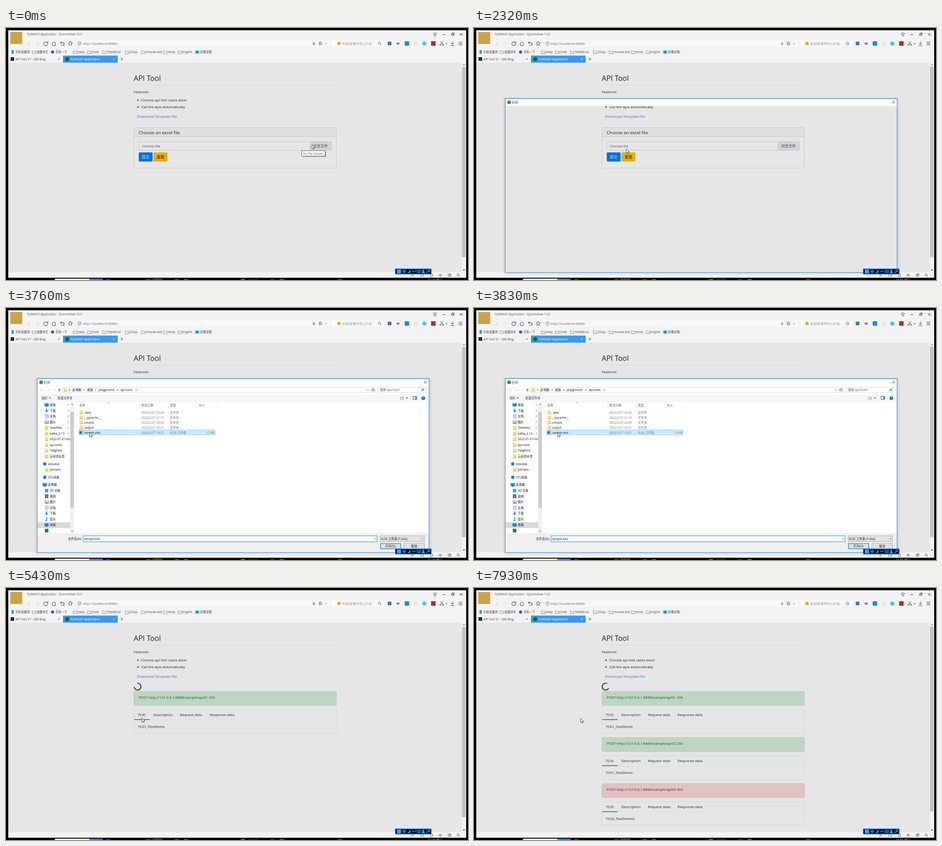
Animation, 1013 px wide and 553 px high, one loop 8 s. Source, as an HTML page:

```html
<!DOCTYPE html>
<html lang="zh-CN">
<head>
<meta charset="utf-8">
<title>API Tool</title>
<style>
html, body { margin: 0; width: 100%; height: 100%; overflow: hidden; background: #000; }
svg { display: block; width: 100vw; height: 100vh; }
text { font-family: "Open Sans", "Noto Sans CJK SC", "Noto Sans CJK", "Noto Sans", sans-serif; white-space: pre; }
</style>
</head>
<body>
<svg id="stage" viewBox="0 0 1013 553"></svg>
<script>
const LOOP = 8000;
const UI = 6.5, BODY = 7.93;
const stage = document.getElementById('stage');

function el(parent, name, attrs = {}) {
  const node = document.createElementNS('http://www.w3.org/2000/svg', name);
  for (const key in attrs) node.setAttribute(key, attrs[key]);
  parent.append(node);
  return node;
}
const group = (parent, attrs) => el(parent, 'g', attrs);
const rect = (p, x, y, width, height, fill, extra) => el(p, 'rect', { x, y, width, height, fill, ...extra });
const dot = (p, cx, cy, r, fill, extra) => el(p, 'circle', { cx, cy, r, fill, ...extra });
const line = (p, d, stroke = '#444', width = 1, fill = 'none') =>
  el(p, 'path', { d, stroke, fill, 'stroke-width': width });
function text(p, x, y, str, size = UI, fill = '#222', extra) {
  const node = el(p, 'text', { x, y, 'font-size': size, fill, ...extra });
  node.textContent = str;
  return node;
}
// Crisp one pixel frame
const box = (p, x, y, w, h, fill, stroke, rx = 0) =>
  rect(p, x + .5, y + .5, w - 1, h - 1, fill, { stroke, rx });
const cross = (p, x, y, r, color) =>
  line(p, `M${x - r} ${y - r}l${2 * r} ${2 * r}m0 ${-2 * r}l${-2 * r} ${2 * r}`, color, .9);
const chevron = (p, x, y, dx, dy, color = '#555') => dx
  ? line(p, `M${x - dx} ${y - 2}L${x} ${y}L${x - dx} ${y + 2}`, color, .9)
  : line(p, `M${x - 2.2} ${y - dy}L${x} ${y}L${x + 2.2} ${y - dy}`, color, .9);
const lens = (p, x, y, r = 2.6) => {
  dot(p, x, y, r, 'none', { stroke: '#555', 'stroke-width': .9 });
  line(p, `M${x + r * .7} ${y + r * .7}l2 2`, '#555');
};

function icon(p, kind, x, y) {
  if (kind === 'folder') {
    rect(p, x - 3.5, y - 4, 7.5, 8, '#f8d775');
    rect(p, x - 3.5, y + 2.5, 7.5, 1.5, '#e9bd4e');
  } else if (kind === 'linked') {
    icon(p, 'folder', x, y);
    rect(p, x - .5, y - 1.5, 4.5, 5.5, '#fff');
    rect(p, x + .5, y, 2.5, 3, '#7fa9a0');
  } else if (kind === 'screen') {
    rect(p, x - 4.5, y - 3.5, 9, 6.5, '#1c86d8');
    rect(p, x - 2, y + 3, 4, 1, '#1c6aaa');
  } else if (kind === 'down') {
    line(p, `M${x - 1.3} ${y - 4}h2.6v4h2.7l-4 4l-4-4h2.7z`, 'none', 0, '#2b8be0');
  } else if (kind === 'doc') {
    box(p, x - 3, y - 4, 7, 8, '#fff', '#7c98ad');
    line(p, `M${x - 1.5} ${y - 1}h4m-4 2h4`, '#5a8fb5', .7);
  } else if (kind === 'picture') {
    box(p, x - 4, y - 3, 9, 7, '#dff0fb', '#7c98ad');
    line(p, `M${x - 3} ${y + 2.5}l2.5-3l2 2l1.5-1l1 2z`, 'none', 0, '#3a7fb5');
  } else if (kind === 'video') {
    rect(p, x - 3.5, y - 4, 7, 8, '#333');
    rect(p, x - 2, y - 3, 4, 6, '#5a9ad0');
  } else if (kind === 'music') {
    line(p, `M${x} ${y + 2}v-5.5l2.5 2.5`, '#1c86d8', 1.2);
    dot(p, x - 1, y + 2.5, 1.6, '#1c86d8');
  } else if (kind === 'cube') {
    rect(p, x - 3.5, y - 3.5, 7, 7, '#28a3d8', { rx: 1 });
  } else if (kind === 'green') {
    rect(p, x - 4, y - 4, 8, 8, '#2e7d46', { rx: 1 });
  } else if (kind === 'cloud') {
    dot(p, x, y, 3.6, '#1c7fd6');
  }
}

function star(p, x, y, r) {
  let d = '';
  for (let i = 0; i < 10; i++) {
    const a = i * Math.PI / 5 - Math.PI / 2, k = i % 2 ? r * .45 : r;
    d += `${i ? 'L' : 'M'}${x + k * Math.cos(a)} ${y + k * Math.sin(a)}`;
  }
  line(p, d + 'z', '#444', .9);
}

function drawBrowser(p) {
  rect(p, 0, 0, 1013, 553, '#000');
  rect(p, 5, 5, 1004, 543, '#f3f3f3');
  rect(p, 9.5, 9, 26, 26, '#c9a548');
  text(p, 46, 16.2, 'PyWebIO Application - Quormelow 13.0', 6.6, '#555');

  line(p, 'M937 12l2-1.5q1.5 1.5 3 0l2 1.5l-1 2l-1-.5v4h-3v-4l-1 .5z', '#444', .9);
  line(p, 'M957 14.5h6', '#333');
  line(p, 'M977 12.5h4v4h-4zM978.5 12v-1h4v4h-1', '#333', .9);
  cross(p, 998, 14, 2.7, '#333');

  // Navigation row
  rect(p, 154, 27, 556, 14, '#f8f8f8');
  line(p, 'M53 30l-4.5 4l4.5 4M67 30l4.5 4l-4.5 4', '#c8c8c8');
  line(p, 'M90.5 31.5a4.3 4.3 0 1 0 1 2.5M91.8 29v3.5h-3.5', '#444', 1.1);
  line(p, 'M100.5 34.5l4.5-4.5l4.5 4.5M102 33.5v5h6v-5', '#444');
  line(p, 'M122 30l-2.5 2.3l2.5 2.3M120 32.3h4.5a3 3 0 0 1 0 6h-3.5', '#444', 1.1);
  star(p, 141, 34, 5.2);
  line(p, 'M161 30l3.5 1v3.5q-.5 3-3.5 4q-3-1-3.5-4v-3.5zM159.5 34h3M161 32.5v3', '#666', .8);
  text(p, 168, 36.7, 'http://localhost:8080/', 7.58, '#666');
  line(p, 'M676 31l-3 4h2.5l-1 3l3.5-4h-2.5z', '#666', .8);
  star(p, 689, 34, 4);
  chevron(p, 701.5, 35.5, 0, 2);
  rect(p, 714, 27, 7, 14, '#fff');
  rect(p, 722, 27, 107, 14, '#f8f8f8');
  dot(p, 730, 34, 3.6, '#d9a520');
  text(p, 737, 36.5, '实拍海港市中心灯会', 7.3, '#999');
  lens(p, 819, 33.5);
  rect(p, 837, 30, 8, 8, '#477d95');
  line(p, 'M856 34q4-3.5 7.5 0q-3.5 3.5-7.5 0', '#47617d', 1);
  dot(p, 859.7, 34.5, 1.6, '#2d5b95');
  rect(p, 874, 29, 10, 10, '#2487ec', { rx: 2.5 });
  rect(p, 894, 30, 9, 8.5, '#f1e3d3', { rx: 2 });
  dot(p, 917.3, 34, 4.6, '#53c0e2');
  rect(p, 932, 29, 10, 10, '#a63a28');
  line(p, 'M953 29.5l5 6.5M958 29.5l-5 6.5', '#444');
  dot(p, 952.5, 37, 1.4, 'none', { stroke: '#444' });
  dot(p, 958.5, 37, 1.4, 'none', { stroke: '#444' });
  line(p, 'M964 34h4l-2 2.2z', 'none', 0, '#444');
  line(p, 'M979 29.5v6m-3-2.5l3 3l3-3M975 38.5h8', '#444');
  line(p, 'M992.5 31h8m-8 3h8m-8 3h8', '#444');

  // Bookmarks
  const marks = [[20, '手机收藏夹'], [67, '收藏夹栏'], [108, '寻答一下'], [157, 'Daily'], [188, 'Code'],
    [221, 'TellisBrost'], [271, 'Zolup'], [306, 'mosowl.test'], [355, 'temp'], [387, 'English'], [425, '咕噜咕噜']];
  marks.forEach(([x, label], i) => {
    text(p, x, 55, label, UI, '#444');
    if (i === 0) rect(p, 12, 48.5, 5, 8, '#2b95e8', { rx: 1 });
    else if (i === 2) dot(p, 102, 52.7, 3.4, '#2a5fd8');
    else if (i === 10) rect(p, 415, 49.5, 8, 6.5, '#19a0dc', { rx: 1.5 });
    else line(p, `M${x - 9.5} 50h3l1 1.2h4v5h-8z`, '#777', .8);
  });

  // Tabs
  rect(p, 10, 64, 8, 8, '#2a2a2a', { rx: 1 });
  text(p, 21, 70.5, 'API Tool V1 - QM Blog', 6.6, '#444');
  cross(p, 116, 68, 1.8, '#777');
  rect(p, 125, 60.5, 120, 15.5, '#3a97f0');
  dot(p, 134.3, 68.2, 4.5, '#0b7410');
  text(p, 141.5, 70.5, 'PyWebIO Application', 6.6, '#fff');
  cross(p, 236.5, 68, 1.8, '#d8ebff');
  line(p, 'M250.5 68h7M254 64.5v7', '#555', .9);

  // Page, scroll track, status bar
  rect(p, 5, 76, 994, 460, '#e6e6e6');
  rect(p, 999, 76, 10, 460, '#f1f1f1');
  line(p, 'M1001.5 81.5l2.5-2.5l2.5 2.5z', 'none', 0, '#777');
  line(p, 'M1001.5 530l2.5 2.5l2.5-2.5z', 'none', 0, '#333');
  line(p, 'M889 546l5-6m-5 1l5 4M909.5 540h6v5h-6zM930 540h5v5.5h-5z', '#555', .9);
  line(p, 'M949 541.5h1.5l2-2v6l-2-2h-1.5zM954.5 540.5q1.5 2 0 4M969.5 541h4v4h-4zM971 541v-1.5h4.5v4h-2', '#555', .9);
  lens(p, 991.5, 542, 2.4);
}

function drawTaskbar(p) {
  rect(p, 107, 550, 76, 3, '#f4f4f4');
  rect(p, 183, 550, 29, 3, '#1583f0');
  rect(p, 321, 549, 22, 4, '#3a3a3a');
  [[220, '#a04020'], [308, '#2070b0'], [370, '#1c70c8'], [390, '#777'], [515, '#b09030'],
    [580, '#2050b0'], [600, '#b08a20'], [728, '#1c70a8']].forEach(([x, c]) => rect(p, x, 551.5, 9, 1.5, c));
  rect(p, 532, 549, 20, 4, '#0c2415');
  text(p, 925, 556, '22:18 周日', 6.6, '#ddd');
}

function drawInputBar(p) {
  rect(p, 853.5, 528.5, 79, 11.5, '#0b1224', { stroke: '#1c8cf5', 'stroke-width': 1.4, rx: 1 });
  const blue = '#3ba0ff';
  rect(p, 857, 530, 9, 8.5, blue, { rx: 1 });
  text(p, 869.5, 536.9, '中', 7.4, '#6fbcff', { 'font-weight': 700 });
  line(p, 'M885 531a3.6 3.6 0 1 1-4.5 5.5q4-1 4.5-5.5z', 'none', 0, blue);
  dot(p, 892.5, 534, 1.3, blue);
  dot(p, 896.5, 534, 1.3, blue);
  line(p, 'M901 531.5h8v5h-8zM902 533.5h6M903 535.5h4', blue, .9);
  dot(p, 915, 532.2, 2, blue);
  line(p, 'M912 538q0-4 3-4t3 4z', 'none', 0, blue);
  line(p, 'M922.5 537.5l4-4', blue, 1.6);
  dot(p, 927.3, 532.7, 2, 'none', { stroke: blue, 'stroke-width': 1.2 });
}

function drawIntro(p) {
  text(p, 280, 115.8, 'API Tool', 16, '#1d2023', { 'font-weight': 500 });
  rect(p, 280, 124.5, 444, 1, '#dadada');
  text(p, 280, 143, 'Features:', BODY, '#1f2225');
  ['Choose api test cases excel', 'Call the apis automatically'].forEach((str, i) => {
    dot(p, 289.3, 158.5 + i * 14.7, 1.5, '#1f2225');
    text(p, 296.5, 160.8 + i * 14.7, str, BODY, '#1f2225');
  });
  text(p, 287, 196.8, 'Download Template File', BODY, '#1c7cd8');
}

function drawForm(p) {
  box(p, 280, 218, 445, 90, '#e6e6e6', '#c9c9c9', 2);
  rect(p, 281, 219, 443, 19, '#dfdfdf');
  rect(p, 281, 238, 443, 1, '#c9c9c9');
  text(p, 291, 232.5, 'Choose an excel file', 9.85, '#1f2225', { 'font-weight': 500 });
  box(p, 291, 249, 423, 20, '#e6e6e6', '#bfc4c9', 2);
  rect(p, 667, 250, 46, 18, '#d2d5d9');
  rect(p, 666, 250, 1, 18, '#bfc4c9');
  text(p, 673, 262, '浏览文件', 8.2, '#444a50');
  const submit = rect(p, 291, 273, 30.5, 20, '#0070e8', { rx: 2 });
  text(p, 298, 286, '提交', 8.2, '#e6e6e6');
  rect(p, 323.5, 273, 30.5, 20, '#e6ac08', { rx: 2 });
  text(p, 330.5, 286, '重置', 8.2, '#1f2225');
  return {
    submit,
    empty: text(p, 297.5, 261.8, 'Choose file', BODY, '#4a5056'),
    chosen: text(p, 297, 261.8, 'sample.xlsx', BODY, '#4a5056'),
  };
}

function drawResult(p, y, request, ok, caseId) {
  const [fill, edge, ink] = ok ? ['#bfd5c4', '#b0cdb8', '#134e20'] : ['#dfc2c4', '#d8b4b8', '#671920'];
  box(p, 280, y, 445, 32, fill, edge, 2);
  text(p, 291, y + 16.5, 'POST http://127.0.0.1:8888/sample/' + request, BODY, ink);
  box(p, 280, y + 40, 445, 53, '#e5e5e5', '#d6d6d6');
  rect(p, 281, y + 62, 443, 1, '#dedede');
  rect(p, 281, y + 61.5, 34, 1.5, '#1f5fae');
  [[289, 'TCID'], [323, 'Description'], [381.5, 'Request data'], [446.5, 'Response data']]
    .forEach(([x, str]) => text(p, x, y + 54, str, BODY, '#1f2225'));
  text(p, 289, y + 80.8, caseId, BODY, '#1f2225');
}

function drawDialogFrame(p) {
  // Soft shadow, fading outwards
  for (let i = 1; i < 9; i++) {
    box(p, 68 - i, 155 - i / 2, 860 + 2 * i, 382 + 1.5 * i, 'none', `rgba(0,0,0,${.14 * (1 - i / 9) ** 2})`, i);
  }
  box(p, 68, 155, 860, 382, 'none', '#3f8fd2');
  rect(p, 69, 156, 858, 15.5, '#fff');
  dot(p, 77, 163, 4, '#2f7fc8');
  text(p, 83.5, 165.5, '打开', UI, '#111');
  cross(p, 919.5, 163, 2.8, '#333');
}

function drawDialogBody(p) {
  rect(p, 69, 171, 858, 365, '#fff');
  line(p, 'M82 180h-6m2.5-2.5l-2.5 2.5l2.5 2.5M91 180h6m-2.5-2.5l2.5 2.5l-2.5 2.5', '#c4c4c4', .9);
  chevron(p, 106, 181, 0, 1.5, '#bbb');
  line(p, 'M117 183.5v-6m-2.7 2.7l2.7-2.7l2.7 2.7', '#333');
  box(p, 124, 174, 685, 12, '#fff', '#d9d9d9');
  icon(p, 'linked', 130, 180);
  [[145.5, '此电脑'], [177.5, '桌面'], [203, 'playground'], [251.5, 'api-tools']]
    .forEach(([x, str]) => text(p, x, 182.4, str, UI, '#111'));
  [140, 172, 197.5, 245.5, 286].forEach(x => chevron(p, x, 180, 1.7, 0, '#333'));
  chevron(p, 793.5, 181.3, 0, 2.2);
  line(p, 'M806 178.5a2.5 2.5 0 1 0 .5 1.5M806.5 177v2h-2', '#333', .9);
  box(p, 815, 174, 106, 12, '#fff', '#d9d9d9');
  text(p, 820, 182.4, '搜索"api-tools"', UI, '#555');
  line(p, 'M910.5 183l2.5-2.5', '#444');
  dot(p, 914.3, 179, 2, 'none', { stroke: '#444' });

  rect(p, 69, 189.5, 858, 17, '#f5f6f7');
  text(p, 78, 200.2, '组织', UI, '#1b2a4a');
  line(p, 'M94 196.5h4l-2 2.3zM877 196.5h4l-2 2.3z', 'none', 0, '#222');
  text(p, 113, 200.2, '新建文件夹', UI, '#1b2a4a');
  line(p, 'M864 195.5h2m1.5 0h4m-7.5 2.3h2m1.5 0h4m-7.5 2.3h2m1.5 0h4', '#777');
  box(p, 892, 194, 9, 7, '#fff', '#557');
  rect(p, 897, 195, 3, 5, '#5aa0d8');
  dot(p, 915, 197.7, 4, '#1467b8');
  text(p, 913.5, 200.2, '?', 6.5, '#fff', { 'font-weight': 700 });

  // File list
  chevron(p, 225.5, 207, 0, -1.5, '#888');
  [[160.5, '名称'], [297, '修改日期'], [359.5, '类型'], [422.5, '大小']]
    .forEach(([x, str]) => text(p, x, 215.7, str, UI, '#4c607a'));
  [293, 356, 418.5, 460.5].forEach(x => rect(p, x, 207, 1, 14, '#e5e5e5'));
  const selection = box(p, 159, 267, 300, 12, '#cce8ff', '#99d1ff');
  const files = [['.idea', '20:24'], ['__pycache__', '21:10'], ['cmutils', '20:09'], ['output', '20:21'], ['sample.xlsx', '18:21']];
  files.forEach(([name, time], i) => {
    const y = 229.2 + i * 11, sheet = i === 4;
    icon(p, sheet ? 'doc' : 'linked', 165, y);
    if (sheet) rect(p, 161, y - 2.5, 5, 5, '#2a5a9a');
    text(p, 171.5, y + 2.4, name, UI, '#111');
    text(p, 297, y + 2.4, '2022/2/27 ' + time, UI, '#6d6d6d');
    text(p, 359.5, y + 2.4, sheet ? 'XLSX 工作表' : '文件夹', UI, '#6d6d6d');
  });
  text(p, 457, 275.6, '12 KB', UI, '#6d6d6d', { 'text-anchor': 'end' });

  // Sidebar scroll bar
  rect(p, 141, 207, 8, 287, '#f0f0f0');
  const sideThumb = rect(p, 141, 265, 8, 211, '#cdcdcd');
  chevron(p, 145, 210.5, 0, -2, '#333');
  chevron(p, 145, 490.5, 0, 2, '#333');

  // Footer
  rect(p, 69, 494, 858, 42, '#f0f0f0');
  text(p, 166, 508.7, '文件名(N):', UI, '#111', { 'text-anchor': 'end' });
  box(p, 168.5, 499.5, 645.5, 14, '#fff', '#2a86d6');
  chevron(p, 809.5, 507.5, 0, 2);
  box(p, 820, 499.5, 98, 13.5, '#e3e3e3', '#adadad');
  text(p, 822, 508.7, 'XLSX 工作表 (*.xlsx)', UI, '#111');
  chevron(p, 913, 507.5, 0, 2);
  rect(p, 821, 517, 44.5, 11.5, '#e1e1e1', { stroke: '#1a7fd6', 'stroke-width': 1.3 });
  text(p, 843, 525, '打开(O)', UI, '#111', { 'text-anchor': 'middle' });
  box(p, 872, 516, 46, 13, '#e1e1e1', '#adadad');
  text(p, 895, 525, '取消', UI, '#111', { 'text-anchor': 'middle' });
  return {
    selection, sideThumb,
    caret: rect(p, 171, 502, 1, 9, '#111'),
    fileName: text(p, 171, 508.9, 'sample.xlsx', UI, '#111'),
  };
}

function drawSidebar(p) {
  const clip = el(p, 'clipPath', { id: 'side' });
  rect(clip, 69, 207, 72, 287, '#000');
  const list = group(p, { 'clip-path': 'url(#side)' });
  rect(list, 69, 470, 72, 13, '#d9d9d9');
  const sections = [
    [212.7, 89, [['screen', '桌面'], ['down', '下载'], ['doc', '文档'], ['picture', '图片'], ['folder', 'Taskfield'],
      ['folder', 'kafka_2.13-'], ['folder', '2022-01-01-No'], ['linked', 'api-tools'], ['linked', 'TwigNest'], ['folder', '云间流水音']]],
    [342.2, 85, [['cloud', 'Velodisk']]],
    [354.8, 89, [['folder', 'Jotmere']]],
    [371.4, 85, [['cloud', 'QTL网盘']]],
    [388, 85, [['screen', '此电脑']]],
    [400.7, 89, [['cube', '3D 对象'], ['video', '视频'], ['picture', '图片'], ['doc', '文档'], ['down', '下载'],
      ['music', '音乐'], ['screen', '桌面'], ['green', '']]],
  ];
  sections.forEach(([top, x, items], s) => items.forEach(([kind, label], i) => {
    const y = top + i * 12.54;
    icon(list, kind, x, y);
    text(list, x + 7, y + 2.4, label, UI, '#111');
    if (!s && i < 6) line(list, `M134.5 ${y + 2}l2-2m-1-1.5l2.5 2.5m-1.5-3.5l2 2`, '#888', .9);
  }));
}

function drawTooltip(p) {
  rect(p, 650.5, 271.5, 51, 11, '#000', { opacity: .4 });
  box(p, 648, 269, 52, 12.5, '#fff', '#767676');
  text(p, 652, 277.8, 'No file chosen', 6.6, '#575757');
}

drawBrowser(stage);
const thumb = rect(stage, 1000, 85, 7.5, 418, '#c1c1c1');
drawTaskbar(stage);
drawIntro(stage);
const form = group(stage);
const { submit, empty, chosen } = drawForm(form);
const spinner = line(stage, 'M293.8 221.8A7.5 7.5 0 1 1 293.8 211.2', '#34383c', 2.1);

const results = [[4950, 'api01 200', true, 'TC01_TestDemo'], [6330, 'api02 200', true, 'TC01_TestDemo'],
  [7380, 'api03 404', false, 'TC02_TestDemo2']].map(([start, request, ok, caseId], i) => {
  const node = group(stage);
  drawResult(node, 226.5 + Math.round(i * 100.8), request, ok, caseId);
  return { start, node };
});

const frame = group(stage);
drawDialogFrame(frame);
const body = group(stage);
const { selection, sideThumb, caret, fileName } = drawDialogBody(body);
const sidebar = group(body);
drawSidebar(sidebar);
const tooltip = group(stage);
drawTooltip(tooltip);
drawInputBar(stage);
const cursor = line(stage, 'M0 0v9.2l2.1-1.9l1.5 3.2l1.5-.7l-1.5-3.1h2.9z', '#222', .8, '#fff');

// Each part is visible from its first time up to its second
const spans = [
  [tooltip, 0, 800], [form, 0, 4850], [empty, 0, 3900], [chosen, 3900, 4850],
  [frame, 2150, 3900], [body, 2480, 3900], [sidebar, 2950, 3900],
  [selection, 3580, 3900], [caret, 2480, 3580], [fileName, 3580, 3900], [spinner, 4850, LOOP],
];
const path = [
  [0, 671, 256], [70, 671, 256], [330, 678, 255.5], [730, 678, 255.5], [1500, 334, 265],
  [2390, 334, 265], [2780, 165, 203], [2850, 165, 203], [3130, 246, 308], [3340, 168, 270],
  [3540, 168, 270], [3700, 183.5, 273], [3950, 183.5, 273], [4300, 312, 298], [4600, 298, 285],
  [6050, 298, 285], [6320, 235, 285], [6870, 235, 285], [7000, 234, 286], [LOOP, 234, 286],
];
const swing = k => .5 - Math.cos(Math.PI * Math.min(1, Math.max(0, k))) / 2;

function render(t) {
  for (const [node, from, to] of spans) node.style.display = t >= from && t < to ? '' : 'none';
  for (const { start, node } of results) {
    node.style.display = t >= start ? '' : 'none';
    node.style.opacity = swing((t - start) / 400);
  }
  submit.setAttribute('fill', t >= 4600 ? '#0058bd' : '#0070e8');
  thumb.setAttribute('height', t >= 7380 ? 405 : 418);
  sideThumb.setAttribute('y', t >= 2950 ? 228 : 265);
  spinner.setAttribute('transform', `rotate(${(t - 6390) / 750 * 360 - 40} 288.5 216.5)`);

  const next = Math.max(1, path.findIndex(([time]) => time > t));
  const [t0, x0, y0] = path[next - 1], [t1, x1, y1] = path[next];
  const k = swing((t - t0) / (t1 - t0));
  cursor.setAttribute('transform', `translate(${x0 + (x1 - x0) * k} ${y0 + (y1 - y0) * k})`);
}

const begin = performance.now();
function tick() {
  render((performance.now() - begin) % LOOP);
  requestAnimationFrame(tick);
}
tick();
</script>
</body>
</html>
```
